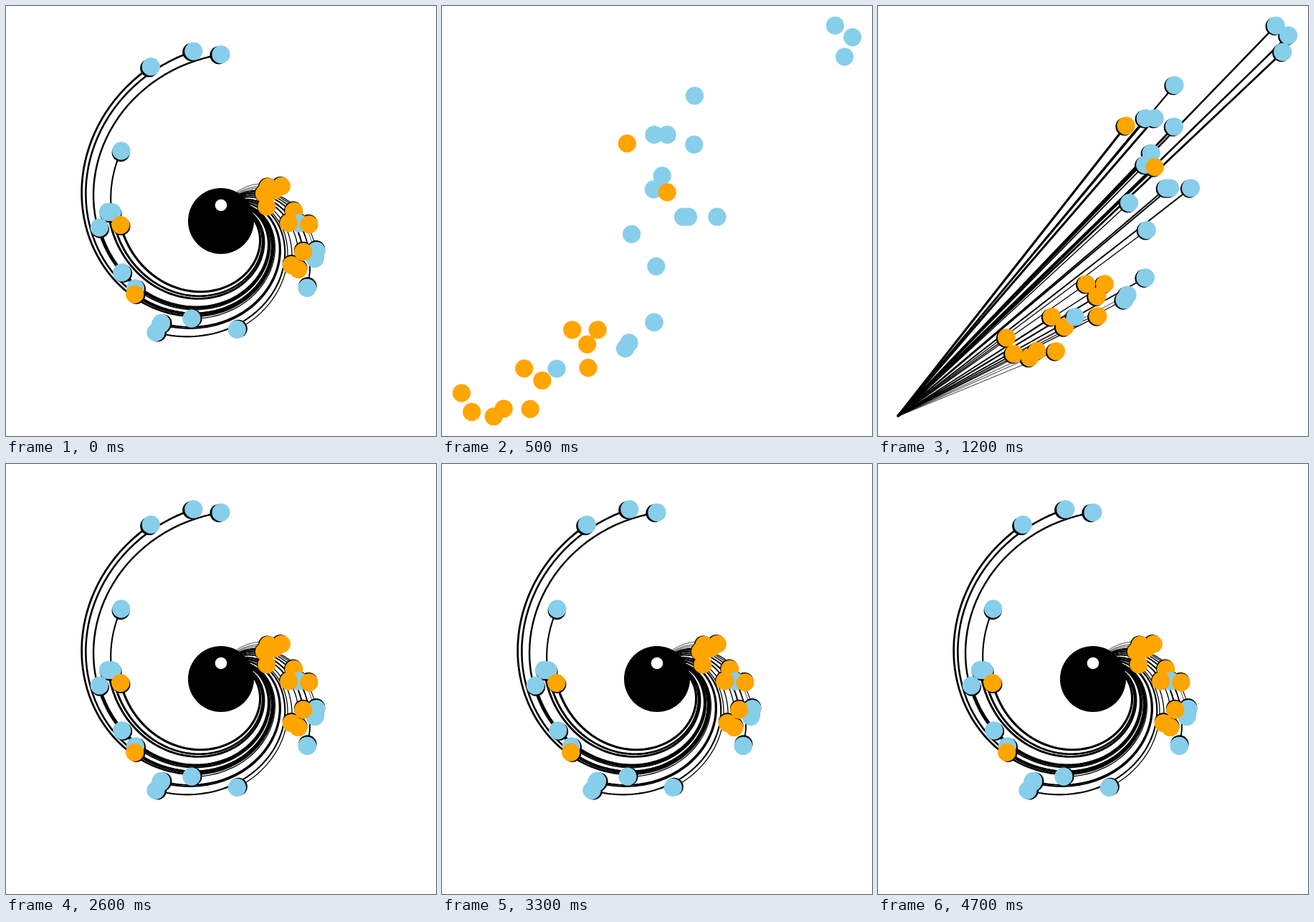
An HTML page with a canvas that plays this animation: 600 by 600 pixels, repeating every 8000 ms.

```html
<!DOCTYPE html>
<html lang="en">
<head>
<meta charset="utf-8">
<style>
html, body { margin: 0; width: 100%; height: 100%; overflow: hidden; background: #fff }
canvas { display: block; width: 600px; height: 600px }
</style>
</head>
<body>
<canvas id="stage" width="600" height="600"></canvas>
<script>
// mtcars columns: weight, displacement, horsepower
const wt = [2.62, 2.875, 2.32, 3.215, 3.44, 3.46, 3.57, 3.19, 3.15, 3.44, 3.44,
  4.07, 3.73, 3.78, 5.25, 5.424, 5.345, 2.2, 1.615, 1.835, 2.465, 3.52, 3.435,
  3.84, 3.845, 1.935, 2.14, 1.513, 3.17, 2.77, 3.57, 2.78];
const disp = [160, 160, 108, 258, 360, 225, 360, 146.7, 140.8, 167.6, 167.6,
  275.8, 275.8, 275.8, 472, 460, 440, 78.7, 75.7, 71.1, 120.1, 318, 304,
  350, 400, 79, 120.3, 95.1, 351, 145, 301, 121];
const hp = [110, 110, 93, 110, 175, 105, 245, 62, 95, 123, 123,
  180, 180, 180, 205, 215, 230, 66, 52, 65, 97, 150, 150,
  245, 175, 66, 91, 113, 264, 175, 335, 109];
const isManual = i => i < 3 || (i > 16 && i < 20) || i > 24;

const MAX_W = 5.424, MIN_W = 1.513, MAX_D = 472, MIN_D = 71.1;
const TAU = 2 * Math.PI, RADIUS = 12.6;
const ctx = document.getElementById('stage').getContext('2d');

// Coordinate systems: (weight, displacement) -> pixels
const cartesian = (w0, d0) => (w, d) => [
  300 + 600 / 1.1 * ((w - w0) / (MAX_W - w0) - .5),
  300 - 600 / 1.1 * ((d - d0) / (MAX_D - d0) - .5)
];
const polar = (turn, r) => [
  300 + 240 * r * Math.sin(TAU * turn),
  300 - 240 * r * Math.cos(TAU * turn)
];
const scatter = cartesian(MIN_W, MIN_D);
const rays = cartesian(0, 0);
const byWeight = (w, d) => polar(w / MAX_W, d / MAX_D);
const byDisp = (w, d) => polar(d / MAX_D, w / MAX_W);

function dot([x, y], r, color) {
  ctx.fillStyle = color;
  ctx.beginPath();
  ctx.arc(x, y, r, 0, TAU);
  ctx.fill();
}

function link(project, i, steps) {
  ctx.lineWidth = hp[i] * .012;
  ctx.beginPath();
  for (let k = 0; k <= steps; k++) {
    ctx.lineTo(...project(wt[i] * k / steps, disp[i] * k / steps));
  }
  ctx.stroke();
}

function draw(project, linked, eye) {
  ctx.fillStyle = '#fff';
  ctx.fillRect(0, 0, 600, 600);
  ctx.strokeStyle = '#000';
  if (linked) {
    wt.forEach((w, i) => link(project, i, project === rays ? 1 : 120));
    wt.forEach((w, i) => dot(project(w - .02, disp[i] - 1), RADIUS, '#000'));
  }
  wt.forEach((w, i) => dot(project(w, disp[i]), RADIUS, isManual(i) ? '#ffa500' : '#87ceeb'));
  if (eye) {
    dot([300, 300], 46, '#000');
    dot([300, 278], 8.3, '#fff');
  }
}

function frame(now) {
  const t = now % 8000;
  if (t >= 500 && t < 1200) draw(scatter, false, false);
  else if (t >= 1200 && t < 1900) draw(rays, true, false);
  else if (t >= 1900 && t < 2600) draw(byWeight, true, false);
  else draw(byDisp, true, true);
  requestAnimationFrame(frame);
}
frame(0);
</script>
</body>
</html>
```
